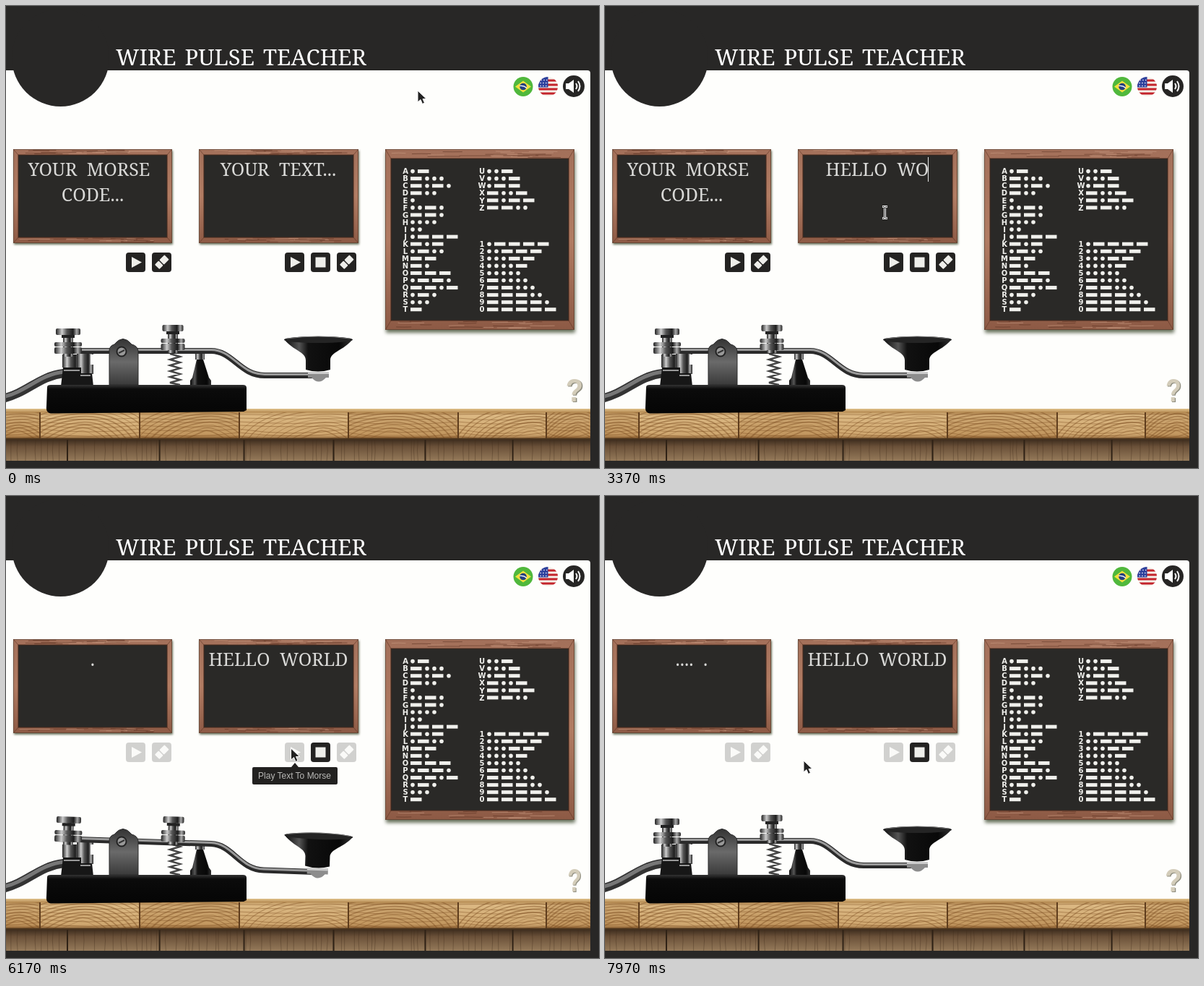
These frames come from a looping animation (821 by 639 pixels, 8000 ms). An HTML page:

```html
<!DOCTYPE html>
<html lang="en">
<head>
<meta charset="utf-8">
<title>Wire Pulse Teacher</title>
<style>
  html, body { margin: 0; width: 100%; height: 100%; overflow: hidden; background: #282726; }
  svg { display: block; }
  text { white-space: pre; }
  .slab { font: 300 25px "Noto Serif", serif; word-spacing: 7px; fill: #d9d9d7; text-anchor: middle; }
  .title { font-size: 31px; word-spacing: 4px; fill: #fff; text-anchor: start; }
  .chart text { font: bold 10px "DejaVu Sans", sans-serif; text-anchor: middle; }
  .tip { font: 12px "Liberation Sans", Arial, sans-serif; text-anchor: middle; }
  .help { font: bold 44px "Liberation Sans", Arial, sans-serif; text-anchor: middle; }
</style>
</head>
<body>
<svg id="stage" width="821" height="639" viewBox="0 0 821 639">
  <defs>
    <linearGradient id="metal"><stop stop-color="#222"/><stop offset=".25" stop-color="#ccc"/><stop offset=".45" stop-color="#555"/><stop offset=".7" stop-color="#1c1c1c"/><stop offset=".85" stop-color="#aaa"/><stop offset="1" stop-color="#222"/></linearGradient>
    <linearGradient id="black"><stop stop-color="#090909"/><stop offset=".22" stop-color="#555"/><stop offset=".35" stop-color="#111"/><stop offset=".8" stop-color="#080808"/><stop offset="1" stop-color="#333"/></linearGradient>
    <linearGradient id="bracket" x2="0" y2="1"><stop stop-color="#333"/><stop offset=".5" stop-color="#6a6a6a"/><stop offset="1" stop-color="#3a3a3a"/></linearGradient>
    <linearGradient id="slabFill" x2="0" y2="1"><stop stop-color="#333"/><stop offset=".15" stop-color="#0b0b0b"/><stop offset="1" stop-color="#050505"/></linearGradient>
    <linearGradient id="tableTop" x2="0" y2="1"><stop stop-color="#e0c28c"/><stop offset=".12" stop-color="#b58a52"/><stop offset=".2" stop-color="#d8b47e"/><stop offset=".85" stop-color="#c89e66"/><stop offset="1" stop-color="#85592d"/></linearGradient>
    <linearGradient id="tableFront" x2="0" y2="1"><stop stop-color="#3a2a1c"/><stop offset=".35" stop-color="#6b5139"/><stop offset="1" stop-color="#957a5a"/></linearGradient>
    <linearGradient id="frame" x2="0" y2="1"><stop stop-color="#a3705a"/><stop offset=".5" stop-color="#b17c63"/><stop offset="1" stop-color="#8d5a45"/></linearGradient>
    <clipPath id="disc"><circle r="13.5"/></clipPath>
  </defs>

  <rect width="821" height="639" fill="#282726"/>
  <rect x="-10" y="89" width="819" height="540" rx="4" fill="#fefefc"/>
  <circle cx="75.5" cy="71.5" r="67.5" fill="#282726"/>
  <text class="slab title" x="152" y="82">WIRE PULSE TEACHER</text>

  <g transform="translate(716 111.5)" clip-path="url(#disc)">
    <circle r="14" fill="#50b83c"/>
    <path d="M-11 0 0-8 11 0 0 8z" fill="#f3e13c"/>
    <circle r="4.8" fill="#25407f"/><path d="M-5-1Q1-2 5 2" fill="none" stroke="#fff" stroke-width="1.2"/>
  </g>
  <g transform="translate(750.5 111.5)" clip-path="url(#disc)">
    <circle r="14" fill="#f6f1ea"/>
    <path d="M-14-8.5H14M-14-2.5H14M-14 3.5H14M-14 9.5H14" stroke="#c3242c" stroke-width="3"/>
    <path d="M-14-14H0V1H-14z" fill="#2c3f9c"/>
    <path d="M-10-9H0M-11-5H0M-11-1H0" stroke="#fff" stroke-width="1.3" stroke-dasharray="1.3 2.5"/>
  </g>
  <g transform="translate(786 111)" fill="none" stroke="#fff" stroke-width="2">
    <circle r="15" fill="#262524" stroke="none"/>
    <path d="M-11-4H-7L0-9V9L-7 4H-11z" fill="#fff" stroke="none"/>
    <path d="M3-4Q6 0 3 4M6-7Q11 0 6 7"/>
  </g>

  <g id="boards"></g>
  <g id="chart" class="chart" fill="#f0f0ec"></g>
  <text id="morse" class="slab" y="235"></text>
  <text id="morse2" class="slab" x="120" y="270">CODE...</text>
  <text id="typed" class="slab" x="377" y="235"></text>
  <path id="caret" d="M0 209V243" stroke="#e8e8e8"/>
  <g id="buttons"></g>
  <g id="table"></g>

  <path d="M-5 543C30 535 45 512 80 508" fill="none" stroke="#333" stroke-width="12"/>
  <path d="M-5 541C30 533 45 510 80 506" fill="none" stroke="#777" stroke-width="5"/>
  <g id="key">
    <path d="M78 482H104V500H78z" fill="url(#metal)"/>
    <path d="M98 474H121V482H117V496H121V509H98z" fill="url(#metal)"/>
    <path d="M79 500H104V508H119L121 526H76z" fill="#171717"/>
    <path d="M80 504H102M103 511H117" stroke="#999" stroke-width="2"/>
    <path d="M57 527Q57 524 62 524H328Q333 524 333 528V559L329 561 62 563.5Q55 563 56 554z" fill="url(#slabFill)"/>
    <path id="spring" fill="none" stroke="#444" stroke-width="2.4"/>
    <path d="M262 479H275V489H262z" fill="url(#metal)"/>
    <path d="M264 489H273L281 514 284 518V524H255V518L258 514z" fill="url(#black)"/>
    <g id="arm">
      <path d="M70 477H284C314 477 324 511 358 511H436" fill="none" stroke="#2a2a2a" stroke-width="8"/>
      <path d="M70 475.5H284C314 475.5 324 509.5 358 509.5H436" fill="none" stroke="#9a9a9a" stroke-width="3"/>
      <g id="screws" fill="url(#metal)"></g>
      <path d="M418 506H447V514H443Q433 525 423 514H418z" fill="#8d8d8d"/>
      <path d="M418 506H447V509H418z" fill="#ccc"/>
      <path d="M385 461C398 477 415 478 415 490V503Q432 508 449 503V490C449 478 467 477 480 461z" fill="url(#black)"/>
      <ellipse cx="432.5" cy="461.5" rx="47.5" ry="4.5" fill="#242424"/>
      <path d="M389 460Q432 454 476 460" fill="none" stroke="#777"/>
    </g>
    <path d="M143 524V477Q143 470 150 468 162 453 174 468 182 470 183 477V524z" fill="url(#bracket)" stroke="#2a2a2a"/>
    <circle cx="160" cy="478" r="6.5" fill="#999" stroke="#222" stroke-width="2"/><path d="M156 480 164 476" stroke="#333" stroke-width="2"/>
  </g>

  <g id="help"><text class="help" x="1.5" y="16" fill="#8f8e80">?</text><text id="helpFace" class="help" y="15">?</text></g>
  <g id="tooltip">
    <path d="M395 375 400 369 405 375H457Q459 375 459 377V397Q459 399 457 399H343Q341 399 341 397V377Q341 375 343 375z" fill="#222120"/>
    <text class="tip" x="399.5" y="391" fill="#b9b9b7">Play Text To Morse</text>
  </g>
  <path id="arrow" d="M0 0V16L4 12.5 6.5 18.5 9.5 17 7 11.5H12z" fill="#222" stroke="#fff"/>
  <g id="ibeam" fill="none">
    <path d="M-3.5-8H-1L0-7 1-8H3.5M0-7V7M-3.5 8H-1L0 7 1 8H3.5" stroke="#fff" stroke-width="3"/>
    <path d="M-3-8H-1L0-7 1-8H3M0-7V7M-3 8H-1L0 7 1 8H3" stroke="#222"/>
  </g>
</svg>

<script>
const $ = id => document.getElementById(id);
const place = (id, x, y, rest = '') => $(id).setAttribute('transform', `translate(${x} ${y}) ${rest}`);
const show = (id, on) => $(id).setAttribute('opacity', +on);
const clamp = v => Math.max(0, Math.min(1, v));
const rect = (x, y, w, h, more) => `<rect x="${x}" y="${y}" width="${w}" height="${h}" ${more}/>`;

let seed = 7;
const random = () => (seed = seed * 16807 % 2147483647) / 2147483647;

// Wooden blackboard frames; side and edge are the frame's thicknesses.
function board(x, y, w, h, side, edge) {
  const streaks = count => {
    let d = '';
    for (let i = 0; i < count; i++) {
      const gx = x + 8 + random() * (w - 60), len = 15 + random() * 35;
      const gy = (i % 2 ? y : y + h - edge) + 1 + random() * (edge - 2);
      d += `M${gx} ${gy}q${len / 2} ${random() * 2 - 1} ${len} 0`;
    }
    return d;
  };
  const corners = `M${x} ${y}l${side} ${edge}M${x + w} ${y}l${-side} ${edge}M${x} ${y + h}l${side} ${-edge}M${x + w} ${y + h}l${-side} ${-edge}`;
  return `<g style="filter: drop-shadow(1.5px ${edge * .35}px ${edge * .2}px #66705a)">
    ${rect(x, y, w, h, 'fill="url(#frame)" stroke="#63402f" stroke-width=".8"')}
    <path d="${streaks(18)}" fill="none" stroke="#c99a80" stroke-opacity=".6"/>
    <path d="${streaks(20)}${corners}" fill="none" stroke="#5a3020" stroke-opacity=".55"/>
    ${rect(x + side, y + edge, w - 2 * side, h - 2 * edge, 'fill="#2a2927" stroke="#45291d"')}</g>`;
}
$('boards').innerHTML = board(10.5, 198.5, 219, 129, 6.5, 7.5) + board(267.5, 198.5, 220, 129, 6.5, 7.5) + board(525.5, 198.5, 261, 249, 7.5, 12.5);

function chartColumn(labels, codes, x, top) {
  return codes.split(' ').map((code, row) => {
    const y = top + row * 10.06;
    let cx = x + 7;
    let out = `<text x="${x}" y="${y + 3.7}">${labels[row]}</text>`;
    for (const mark of code) {
      out += mark === '.' ? `<circle cx="${cx + 3}" cy="${y}" r="2.8"/>` : rect(cx, y - 2.5, 15.5, 5, '');
      cx += mark === '.' ? 10 : 20;
    }
    return out;
  }).join('');
}
$('chart').innerHTML =
  chartColumn('ABCDEFGHIJKLMNOPQRST', '.- -... -.-. -.. . ..-. --. .... .. .--- -.- .-.. -- -. --- .--. --.- .-. ... -', 553, 228.6) +
  chartColumn('UVWXYZ', '..- ...- .-- -..- -.-- --..', 659, 228.6) +
  chartColumn('1234567890', '.---- ..--- ...-- ....- ..... -.... --... ---.. ----. -----', 659, 329.2);

const icons = {
  play: '<path d="M8 6V21L22 13.5z"/>',
  stop: rect(6.5, 6.5, 14, 14, ''),
  erase: `<g transform="translate(13.5 13.5) rotate(-45)">${rect(-9, -4.5, 7.5, 9, 'rx="1"')}${rect(0, -4.5, 10, 9, 'rx="1"')}</g>`
};
const button = (x, icon) => `<g class="${icon}" transform="translate(${x} 341)">${rect(0, 0, 27, 27, 'rx="4" fill="#242322"')}<g fill="#eeeeea">${icons[icon]}</g></g>`;
$('buttons').innerHTML = button(166, 'play') + button(202, 'erase') + button(386, 'play') + button(422, 'stop') + button(458, 'erase');
const lockable = document.querySelectorAll('.play, .erase');

// Table: planks with oval grain, above a shaded front of upright boards.
function table() {
  const joints = [-70, 46, 184, 322, 473, 625, 747, 880];
  let out = rect(0, 557, 809, 42, 'fill="url(#tableTop)"') + rect(0, 599, 809, 30, 'fill="url(#tableFront)"');
  for (let i = 0; i < 7; i++) {
    const x = joints[i], w = Math.min(joints[i + 1], 809) - x, cx = w * (.3 + random() * .5);
    let grain = '';
    for (let k = 1; k < 11; k++) {
      const reach = k * w / 16;
      grain += `<path d="M${cx - reach - 25} 40Q${cx - reach} ${34 - k * 4} ${cx} ${30 - k * 4}T${cx + reach + 25} 40" stroke-width="${.6 + random() * 1.4}"/>`;
    }
    for (let k = 0; k < 7; k++) grain += `<path d="M0 ${3 + k * 5}Q${w / 2} ${k * 7 + random() * 8} ${w} ${3 + k * 5}"/>`;
    out += `<svg x="${x}" y="562" width="${w}" height="36">${rect(0, 0, w, 36, `fill="${i % 2 ? '#f0d8a8' : '#8a5a28'}" opacity=".12"`)}
      <g fill="none" stroke="#7a4c20" stroke-opacity=".45">${grain}</g>${rect(0, 0, 2, 36, 'fill="#5f3d1d"')}</svg>`;
  }
  let seams = '', fibres = '';
  for (let x = 85; x < 809; x += 112 + random() * 16) seams += `M${x} 600V629`;
  for (let x = 0; x < 809; x += 4 + random() * 12) fibres += `M${x} 600q${random() * 4 - 2} 15 0 29`;
  return out + `<path d="${fibres}" fill="none" stroke="#3f2c1b" stroke-opacity=".35"/><path d="${seams}" stroke="#2f2216" stroke-width="2"/>
    <path d="M0 598.5H809" stroke="#4e371f" stroke-width="2"/>`;
}
$('table').innerHTML = table();

const thumbscrew = (cx, y, half) => rect(cx - 7, y + 3, 14, 36, '') +
  rect(cx - half, y, half * 2, 9, 'rx="2"') + rect(cx - 9, y + 9, 18, 4, 'fill="#222"') +
  rect(cx - half - 2, y + 19, half * 2 + 4, 6, 'rx="2"') + rect(cx - half - 2, y + 26, half * 2 + 4, 9, 'rx="2"');
$('screws').innerHTML = thumbscrew(86, 446, 17) + thumbscrew(231, 441, 14.5);
$('spring').setAttribute('d', 'M227 481' + 'l14 4-14 4'.repeat(5) + 'l14 3');

const LOOP = 8000, UNIT = 170, KEYING = 6050, PLAY = 5850;
const presses = [0, 2, 4, 6, 10].map(n => KEYING + n * UNIT);
const cursorPath = [[100, 570, 117], [900, 400, 262], [1500, 387, 285], [4350, 387, 285], [4700, 332, 330], [5050, 394.5, 349], [6280, 394.5, 349], [6620, 275, 366]];

function cursorAt(t) {
  const next = cursorPath.findIndex(p => p[0] > t);
  if (next === 0) return cursorPath[0].slice(1);
  if (next < 0) return cursorPath.at(-1).slice(1);
  const [t0, x0, y0] = cursorPath[next - 1], [t1, x1, y1] = cursorPath[next];
  const u = (t - t0) / (t1 - t0), e = u * u * (3 - 2 * u);
  return [x0 + (x1 - x0) * e, y0 + (y1 - y0) * e];
}

function draw(t) {
  const playing = t >= PLAY;

  const count = Math.max(0, Math.min(11, Math.floor((t - 2300) / 120)));
  $('typed').textContent = count ? 'HELLO WORLD'.slice(0, count) : 'YOUR TEXT...';
  const caretX = 377 + (count ? $('typed').getComputedTextLength() / 2 : 0);
  place('caret', Math.floor(caretX) - .5, 0);
  show('caret', t > 1570 && !playing && (count ? (t - 3700) % 1000 < 500 : (t - 1570) % 1000 < 500));

  const sent = presses.filter(p => t >= p).length;
  $('morse').textContent = playing ? '.... .'.slice(0, sent > 4 ? 6 : sent) : 'YOUR MORSE';
  $('morse').setAttribute('x', playing ? 120 : 115);
  show('morse2', !playing);
  lockable.forEach(b => b.setAttribute('opacity', playing ? .2 : 1));

  const down = presses.some(p => t >= p && t < p + UNIT);
  $('arm').setAttribute('transform', `rotate(${down ? 1.9 : 0} 160 478)`);

  const fade = clamp((t - 5050) / 200) * clamp((6550 - t) / 150);
  show('tooltip', fade);
  place('tooltip', 0, fade < 1 ? -1 : 0);

  const turn = Math.cos(2 * Math.PI * (t / 1140 - .175));
  place('help', 787, 532, `scale(${Math.sign(turn) * Math.abs(turn) ** .12} 1)`);
  $('helpFace').setAttribute('fill', turn < 0 ? '#aeab9d' : '#d3ccb9');

  const [x, y] = cursorAt(t);
  const overText = x > 274 && x < 482 && y > 206 && y < 321;
  place('arrow', x, y);
  place('ibeam', x + .5, y + .5);
  show('arrow', !overText);
  show('ibeam', overText);
}

const start = performance.now();
function tick() {
  draw((performance.now() - start) % LOOP);
  requestAnimationFrame(tick);
}
tick();
</script>
</body>
</html>
```
